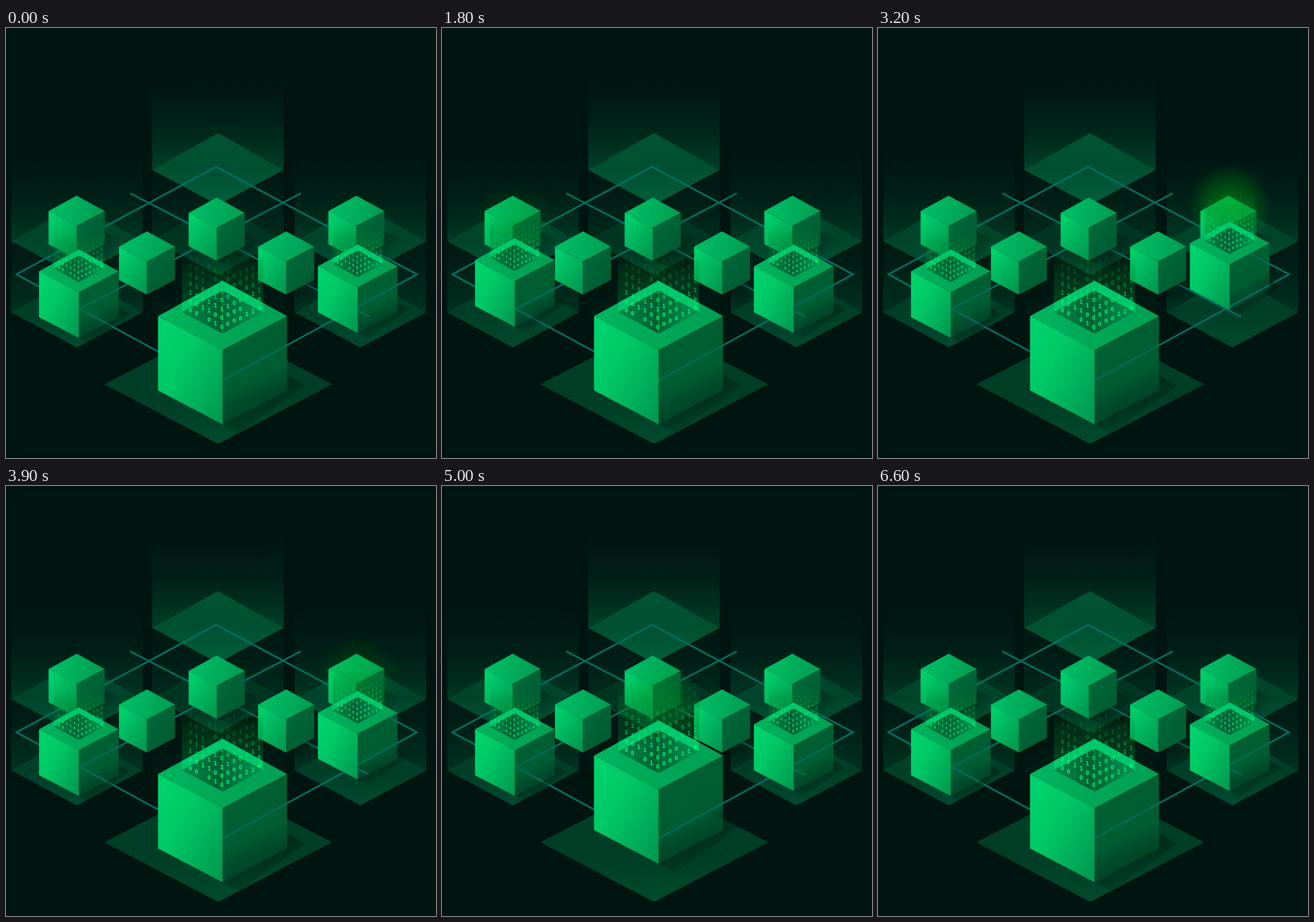
These frames come from a looping animation (700 px wide and 700 px high, 6700 ms). An HTML page with a canvas:

```html
<!DOCTYPE html>
<html lang="en">
<head>
<meta charset="utf-8">
<title>Isometric data blocks</title>
<style>
html, body { margin: 0; width: 100%; height: 100%; overflow: hidden; background: #001410; }
canvas { display: block; width: 700px; height: 700px; }
</style>
</head>
<body>
<canvas id="stage" width="700" height="700"></canvas>
<script>
const ctx = document.getElementById('stage').getContext('2d');
const LOOP = 6700, STEP = 100;
const rgba = (r, g, b, a = 1) => `rgba(${r},${g},${b},${a})`;

function linear(x0, y0, x1, y1, ...stops) {
  const g = ctx.createLinearGradient(x0, y0, x1, y1);
  stops.forEach(([at, color]) => g.addColorStop(at, color));
  return g;
}

function trace(points) {
  ctx.beginPath();
  points.forEach(([x, y]) => ctx.lineTo(x, y));
  ctx.closePath();
}

function poly(fill, ...points) {
  trace(points);
  ctx.fillStyle = fill;
  ctx.fill();
}

// Plate with a wall of light standing on its back edges
function platform(cx, cy, strength) {
  const w = 107, h = 57, top = cy - 157;
  poly(linear(0, top, 0, cy, [0, rgba(0, 110, 65, 0)], [.5, rgba(0, 110, 65, .14 * strength)], [1, rgba(0, 110, 65, .46 * strength)]),
    [cx - w, top], [cx + w, top], [cx + w, cy], [cx, cy - h - 3], [cx - w, cy]);
  poly(linear(0, cy - h, 0, cy + h, [0, rgba(0, 100, 60, .8 * strength)], [.5, rgba(0, 96, 58, .76 * strength)], [1, rgba(0, 108, 68, .84 * strength)]),
    [cx, cy - h - 3], [cx + w, cy], [cx, cy + h], [cx - w, cy]);
}

function wires() {
  ctx.strokeStyle = '#006f5f';
  ctx.lineWidth = 3;
  ctx.lineJoin = 'miter';
  ctx.beginPath();
  for (const path of [
    [[480, 269], [119, 458]],
    [[202, 269], [591, 470]],
    [[340, 577], [17, 401], [342, 226], [669, 401], [352, 574]]
  ]) path.forEach(([x, y], i) => i ? ctx.lineTo(x, y) : ctx.moveTo(x, y));
  ctx.stroke();
}

function smallCube(x, y) {
  const w = 45.7, m = 25, f = 49, d = 54;
  ctx.save();
  ctx.translate(x, y);
  poly(linear(10, 90, 45, 115, [0, rgba(0, 18, 13, .55)], [1, rgba(0, 18, 13, 0)]),
    [0, f + d], [w, m + d], [w, m + d - 20], [w + 34, m + d - 4], [34, f + d + 12]);
  poly(linear(-w, 10, w, 40, [0, '#00c267'], [1, '#009a4f']), [0, 0], [w, m], [0, f], [-w, m]);
  poly(linear(-w, 40, 5, 80, [0, '#00d06b'], [1, '#009a50']), [-w, m], [0, f], [0, f + d], [-w, m + d]);
  poly(linear(0, 50, w, 80, [0, '#00693a'], [1, '#005a31']), [0, f], [w, m], [w, m + d], [0, f + d]);
  ctx.restore();
}

function glow(x, y, amount) {
  const g = ctx.createRadialGradient(x, y, 0, x, y, 68);
  const at = a => rgba(0, 200, 10, a * amount);
  g.addColorStop(0, at(.5));
  g.addColorStop(.5, at(.3));
  g.addColorStop(1, at(0));
  ctx.fillStyle = g;
  ctx.fillRect(x - 70, y - 70, 140, 140);
}

const noise = n => { const v = Math.sin(n * 127.1 + 11.7) * 43758.5453; return v - Math.floor(v); };

// Streams of bits rising out of the opening
function bits(rise) {
  ctx.font = 'bold 9.5px "DejaVu Sans Mono", monospace';
  ctx.textAlign = 'center';
  ctx.textBaseline = 'middle';
  const top = -45 - 45 * rise;
  for (let col = -5; col <= 6; col++) {
    const x = col * 10.2 - 1.5, low = 78 - Math.abs(x) * .53;
    for (let row = 0; row < 12; row++) {
      const key = col * 31 + row * 7.3;
      const y = low - row * 14.5 - noise(col + 40) * 5;
      if (y < top || noise(key) < .2) continue;
      const k = Math.min(1, (y - top) / (40 - top));
      ctx.fillStyle = rgba(0, 150 + 105 * k, 45 + 65 * k, .2 + .75 * k * k);
      ctx.fillText(noise(key + 5) < .5 ? 0 : 1, x, y);
    }
  }
}

function bigCube(x, y, scale, rise) {
  const w = 105, m = 57.5, f = 112.5, d = 121;
  const right = [[0, f], [w, m], [w, m + d], [0, f + d]];
  const a = 66;
  ctx.save();
  ctx.translate(x, y);
  ctx.scale(scale, scale);

  poly(linear(20, 205, 48, 258, [0, rgba(0, 25, 16, .5)], [1, rgba(0, 25, 16, 0)]),
    [0, f + d], [w, m + d], [w, m + d - 25], [w + 30, m + d - 8], [28, f + d + 14]);
  poly(linear(0, f, 49, f + 96, [0, 'rgba(0,98,51,.97)'], [.6, 'rgba(0,94,50,.95)'], [1, 'rgba(0,72,42,.55)']), ...right);
  ctx.save();
  trace(right);
  ctx.clip();
  ctx.setTransform(1, 0, 0, 1, 0, 0);
  ctx.globalAlpha = .85;
  wires();
  ctx.restore();
  poly(linear(-w, 100, 20, 170, [0, '#00d26c'], [.35, '#00c866'], [1, '#009c50']), [-w, m], [0, f], [0, f + d], [-w, m + d]);
  poly(linear(-w, 30, w, 80, [0, '#00b65f'], [.5, '#00a856'], [1, '#00a052']), [0, 0], [w, m], [0, f], [-w, m]);

  // Opening with its lit rim
  poly('#00c76c', [0, 0], [a, 36], [a, 51], [0, 16], [-a, 51], [-a, 36]);
  poly(linear(-a, 50, 0, 50, [0, '#008a49'], [1, '#005e34']), [0, 16], [0, 86], [-a, 51]);
  poly(linear(0, 50, a, 50, [0, '#006538'], [1, '#009a50']), [0, 16], [a, 51], [0, 86]);
  ctx.fillStyle = rgba(0, 190, 95, .6);
  ctx.fillRect(-.5, 16, 1, 70);

  const top = -42 - 35 * rise;
  poly(linear(0, top, 0, 36, [0, rgba(0, 120, 30, 0)], [.35, rgba(0, 120, 40, .24)], [1, rgba(0, 125, 55, .38)]),
    [-a, top], [a, top], [a, 36], [0, 0], [-a, 36]);
  bits(rise);
  ctx.restore();
}

const smalls = [[115, 273], [343, 276], [570.5, 273], [229.5, 331], [456, 331]];
const bigs = [
  { x: 118.5, y: 360.5, scale: .617, lift: 50, start: 0 },
  { x: 572.5, y: 352.5, scale: .617, lift: 41.25, start: 2200 },
  { x: 352.5, y: 411.5, scale: 1, lift: 55, start: 4400 }
];

// Even climb and fall over 2200 ms
const climb = t => Math.max(0, 1 - Math.abs(t - 1100) / 1100);

function draw(t) {
  ctx.fillStyle = '#001410';
  ctx.fillRect(0, 0, 700, 700);
  platform(345, 231, 1);
  platform(345, 345, .55);
  platform(345, 463, .14);
  for (const x of [115.5, 577]) {
    platform(x, 347, .8);
    platform(x, 463, .72);
  }
  poly(linear(0, 484, 0, 677, [0, '#004128'], [.6, '#003d26'], [1, '#004a2d']), [345.5, 484], [531, 580], [345.5, 677], [160, 580]);
  wires();
  smalls.forEach(([x, y]) => smallCube(x, y));
  for (const { x, y, scale, lift, start } of bigs) {
    const rise = climb(t - start), top = y - lift * rise;
    if (rise) glow(x, top - 25, rise ** 1.5);
    bigCube(x, top, scale, rise);
  }
}

function tick() {
  draw(Math.floor(performance.now() % LOOP / STEP) * STEP);
  requestAnimationFrame(tick);
}
tick();
</script>
</body>
</html>
```
